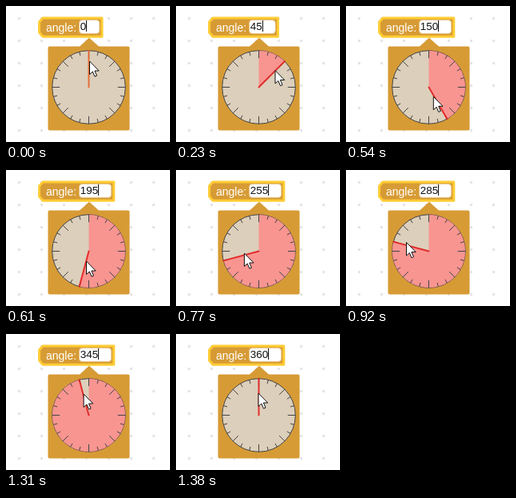
An HTML page for the animation above (1550 ms loop, 205 by 170 pixels).

```html
<!DOCTYPE html>
<html lang="en">
<head>
<meta charset="utf-8">
<title>Angle field</title>
<style>
  html, body { margin: 0; width: 100%; height: 100%; overflow: hidden; background: #fff; }
  svg { display: block; width: 100vw; height: 100vh; }
  text { font: 13.5px "Liberation Sans", Arial, sans-serif; }
  #label { font-size: 14px; }
</style>
</head>
<body>
<svg viewBox="0 0 205 170">
  <defs>
    <pattern id="dots" x="2.5" y="1.5" width="28" height="28" patternUnits="userSpaceOnUse">
      <circle cx="14" cy="14" r="1.5" fill="#d8d8d8"/>
    </pattern>
  </defs>
  <rect width="205" height="170" fill="url(#dots)"/>

  <path id="block" fill="#d79b35" stroke="#fc3" stroke-width="3" stroke-linejoin="round"/>
  <text id="label" x="50" y="31.5" fill="#fff">angle:</text>
  <rect id="field" x="91.5" y="17.5" height="17" rx="4" fill="#fff" stroke="#e8c58a"/>
  <text id="value" x="92.8" y="29.8" fill="#111"></text>
  <path id="caret" stroke="#111"/>

  <path d="M91.5 51L104 39.8L116.5 51Z" fill="#d79b35"/>
  <rect x="52.5" y="50.5" width="102" height="105" rx="2" fill="#d79b35"/>
  <g transform="translate(103.5 101.5)">
    <circle r="45.8" fill="#dccfbb" stroke="#444"/>
    <path id="gauge" fill="#f88" fill-opacity=".8"/>
    <path id="ticks" stroke="#444" fill="none"/>
    <path id="hand" stroke-width="2" stroke-linecap="round" stroke-opacity=".9"/>
  </g>
  <path id="cursor" d="M0 0V16.5L3.8 13L6.5 19.2L9 18.1L6.4 12H11.7Z" fill="#fff" stroke="#111" stroke-linejoin="round"/>
</svg>
<script>
const LOOP = 1550, HOLD = 150, STEP = 230 / 3, LAST = 17;
const CX = 103.5, CY = 101.5, R = 45.8, SNAP = 15;

// Pointer path: step, x, y
const PATH = [
  [0, 104.5, 69], [2, 124, 80.5], [4, 126, 102.5], [7, 100.5, 114],
  [11, 75.5, 90.5], [14, 86, 78], [LAST, 103, 74]
];

const $ = id => document.getElementById(id);
const set = (id, attrs) => {
  for (const key in attrs) $(id).setAttribute(key, attrs[key]);
};
const polar = (deg, r) => {
  const a = deg * Math.PI / 180;
  return `${(r * Math.sin(a)).toFixed(2)} ${(-r * Math.cos(a)).toFixed(2)}`;
};

function slope(i, axis) {
  const a = PATH[Math.max(i - 1, 0)];
  const b = PATH[Math.min(i + 1, PATH.length - 1)];
  return (b[axis] - a[axis]) / (b[0] - a[0]);
}

// Smooth curve through the path points (cubic Hermite)
function pointer(step) {
  const i = Math.max(PATH.findIndex(p => p[0] >= step), 1) - 1;
  const a = PATH[i], b = PATH[i + 1];
  const span = b[0] - a[0], u = (step - a[0]) / span, v = 1 - u;
  return [1, 2].map(axis =>
    v * v * (1 + 2 * u) * a[axis] + u * u * (1 + 2 * v) * b[axis] +
    u * v * span * (v * slope(i, axis) - u * slope(i + 1, axis)));
}

let ticks = "";
for (let deg = 0; deg < 360; deg += SNAP) {
  ticks += `M${polar(deg, R)}L${polar(deg, R - (deg % 45 ? 5 : 9.5))}`;
}
set("ticks", { d: ticks });

function show(step) {
  const [x, y] = pointer(step);
  const heading = (Math.atan2(x - CX, CY - y) * 180 / Math.PI + 360) % 360;
  const angle = Math.round(heading / SNAP) * SNAP;
  const sweep = angle % 360;
  const label = String(angle);
  const textWidth = label.length * 7.4;
  const right = 112.6 + textWidth;
  const caretX = Math.round(93 + textWidth) + 0.5;

  set("block", { d: `M46 14.9H${right}V38.3H46L41.6 33V20Z` });
  set("field", { width: 18 + textWidth });
  set("caret", { d: `M${caretX} 18V32` });
  $("value").textContent = label;
  set("gauge", {
    d: sweep ? `M0 0V${-R}A${R} ${R} 0 ${+(sweep > 180)} 1 ${polar(sweep, R)}Z` : ""
  });
  set("hand", { d: `M0 0L${polar(angle, R)}`, stroke: angle ? "#e21f1f" : "#e8632c" });
  set("cursor", { transform: `translate(${x.toFixed(1)} ${y.toFixed(1)})` });
}

let current;
function tick(now) {
  const t = now % LOOP;
  const step = t < HOLD ? 0 : Math.min(LAST, 1 + Math.floor((t - HOLD) / STEP + 1e-6));
  if (step !== current) show(current = step);
  requestAnimationFrame(tick);
}
tick(0);
</script>
</body>
</html>
```
